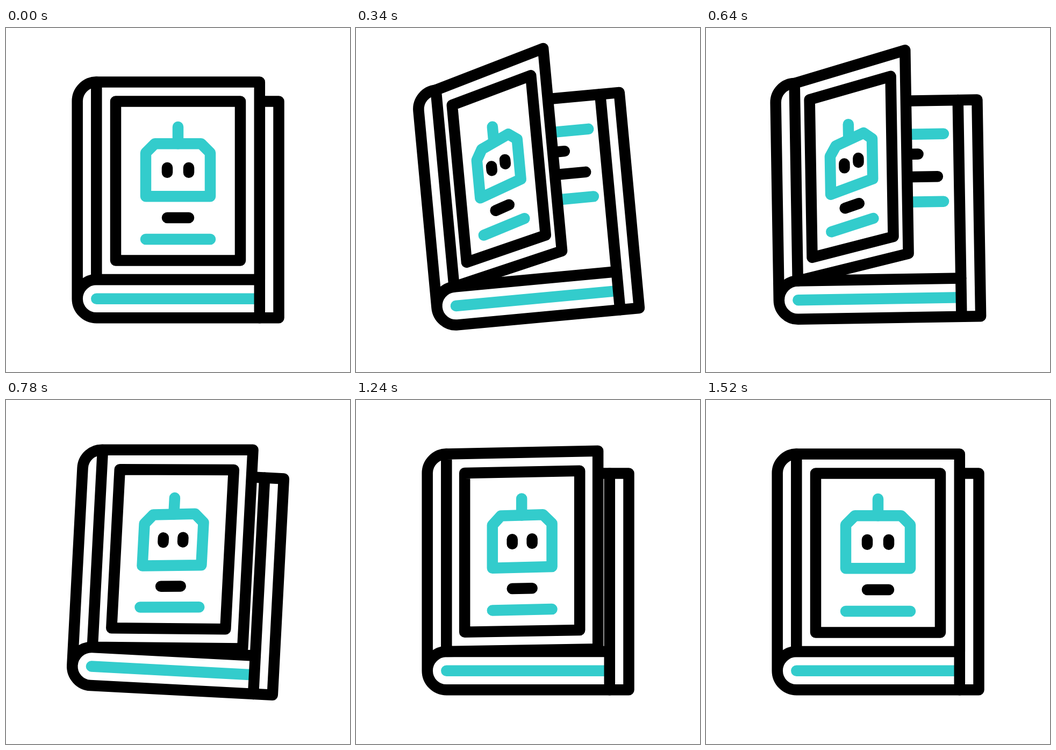
Write an HTML page with a canvas that moves like this. It is 640 px wide and 640 px high and loops after 2.1 s.

```html
<!DOCTYPE html>
<html lang="en">
<head>
<meta charset="utf-8">
<title>Robot book</title>
<style>
  html, body { margin: 0; width: 100%; height: 100%; overflow: hidden; background: #fff; }
  canvas { display: block; }
</style>
</head>
<body>
<canvas id="stage" width="640" height="640"></canvas>
<script>
const ctx = document.getElementById('stage').getContext('2d');
const LOOP = 2100, BLACK = '#000', TEAL = '#33cccc';
const LEFT = 168.3, RIGHT = 471.8, TOP = 100.5, BOTTOM = 468;
const PAGE_TOP = 136.5, BACK_RIGHT = 507.5, BASE = 539.3, CURVE = 35.6;

// Keyframes: [time in ms, value], eased in and out between keys
const TILT = [[0, 0], [240, -6], [400, -5], [500, -5], [780, 3], [1110, 0]];
const OPEN = [[0, 0], [510, 1], [520, 1], [880, 0]];
const BOUNCE = [[880, 0], [1180, 0.18], [1520, 0]];

// How each layer of the cover folds around its centre when fully open
const COVER = { narrow: 0.433, lift: 35.9, stretch: 0.02, skew: 0.236, twist: 0.00013 };
const FRAME = { narrow: 0.47, lift: 35, stretch: 0, skew: 0.226, twist: 0.00009 };
const FACE = { narrow: 0.468, lift: 21.7, stretch: -0.139, skew: 0.33, twist: 0.00055 };

const ease = p => p * p * (3 - 2 * p);

function valueAt(keys, t) {
  const next = keys.findIndex(key => t < key[0]);
  if (next === 0) return keys[0][1];
  if (next < 0) return keys[keys.length - 1][1];
  const [t0, v0] = keys[next - 1], [t1, v1] = keys[next];
  return v0 + (v1 - v0) * ease((t - t0) / (t1 - t0));
}

const rect = (l, t, r, b) => [[l, t], [r, t], [r, b], [l, b]];

function line(points, color = BLACK, closed = false, fill = false) {
  ctx.beginPath();
  points.forEach(([x, y]) => ctx.lineTo(x, y));
  if (closed) ctx.closePath();
  if (fill) ctx.fill();
  ctx.strokeStyle = color;
  ctx.stroke();
}

function drawBody() {
  const pageLine = (y, end, color) => line([[325, y], [end, y]], color);
  pageLine(198.8, 444, TEAL);
  pageLine(235.8, 396, BLACK);
  pageLine(278, 431.6, BLACK);
  pageLine(324.7, 442, TEAL);

  const curveY = BASE - CURVE;
  line([[LEFT, curveY], [RIGHT, curveY]], TEAL);
  line([[RIGHT, PAGE_TOP], [RIGHT, BASE]]);

  // Spine and back cover, then the lower edge of the pages
  ctx.beginPath();
  ctx.arc(LEFT, TOP + CURVE, CURVE, -Math.PI / 2, Math.PI, true);
  ctx.arc(LEFT, curveY, CURVE, Math.PI, Math.PI / 2, true);
  ctx.lineTo(BACK_RIGHT, BASE);
  ctx.lineTo(BACK_RIGHT, PAGE_TOP);
  ctx.lineTo(325, PAGE_TOP);
  ctx.moveTo(LEFT - CURVE, curveY);
  ctx.arc(LEFT, curveY, CURVE, Math.PI, Math.PI * 1.5);
  ctx.lineTo(RIGHT, BOTTOM);
  ctx.strokeStyle = BLACK;
  ctx.stroke();
}

function drawCover(kx, ky) {
  // A point may carry a third value, an extra sideways lean
  const fold = (points, layer) => points.map(([x, y, lean = 0]) => {
    const u = x - 320, v = y - 284;
    const dx = lean - 65.7 - layer.narrow * u;
    const dy = layer.stretch * v - layer.lift - (layer.skew - layer.twist * v) * u;
    return [x + dx * kx, y + dy * ky];
  });
  const face = (points, color, closed) => line(fold(points, FACE), color, closed);

  line(fold(rect(LEFT, TOP, RIGHT, BOTTOM), COVER), BLACK, true, true);
  line(fold(rect(204, PAGE_TOP, 436, 432.5), FRAME), BLACK, true);
  face([[320, 184, -6], [320, 215.3, -6]], TEAL);
  face([[260, 313.3], [260, 232.3], [277, 215.3], [363, 215.3, -6], [380, 232.3], [380, 313.3]], TEAL, true);
  for (const x of [300, 340]) face([[x, 260], [x, 268.7]]);
  face([[300, 353], [340, 353]]);
  face([[260, 393], [380, 393]], TEAL);
}

function draw(t) {
  const open = valueAt(OPEN, t), bounce = valueAt(BOUNCE, t);
  ctx.setTransform(1, 0, 0, 1, 0, 0);
  ctx.fillStyle = '#fff';
  ctx.fillRect(0, 0, 640, 640);
  ctx.lineWidth = 20.5;
  ctx.lineCap = ctx.lineJoin = 'round';
  ctx.translate(320, 320);
  ctx.rotate(valueAt(TILT, t) * Math.PI / 180);
  ctx.translate(-320, -320);
  drawBody();
  drawCover(open + bounce, open + bounce * 0.45);
}

const start = performance.now();
function tick() {
  draw((performance.now() - start) % LOOP);
  requestAnimationFrame(tick);
}
tick();
</script>
</body>
</html>
```
